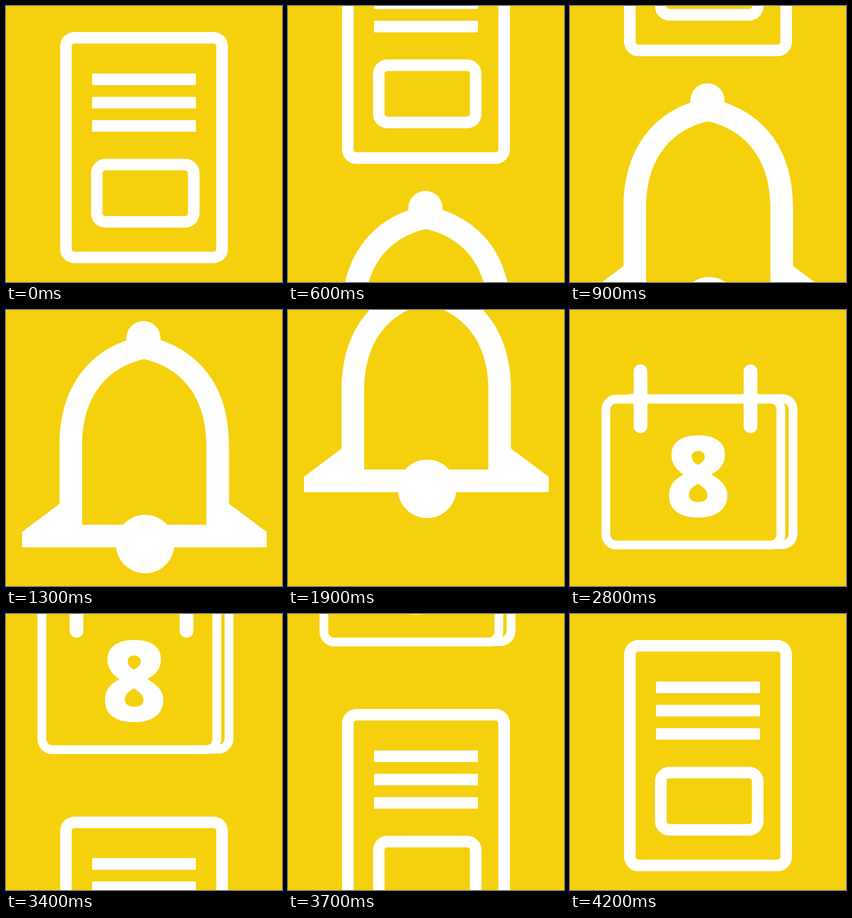
Recreate the animation shown at these times as an HTML page. Size 500x500 px, loop 4300 ms.

```html
<!DOCTYPE html>
<html lang="en">
<head>
<meta charset="utf-8">
<title>Icon scroll</title>
<style>
  html, body { margin: 0; width: 100%; height: 100%; overflow: hidden; background: #f5d00c; }
  svg { display: block; width: 100vw; height: 100vh; }
  .line { fill: none; stroke: #fff; }
  .digit { font: 800 202.5px "Open Sans", sans-serif; text-anchor: middle; }
</style>
</head>
<body>
<svg viewBox="0 0 500 500">
  <defs>
    <g id="page">
      <g class="line" stroke-width="21">
        <rect x="108.5" y="57.5" width="283" height="398" rx="15.5"/>
        <rect x="164.5" y="287.3" width="175.6" height="103.6" rx="15.5"/>
        <path d="M156 132.8H344M156 174.9H344M156 217.2H344"/>
      </g>
    </g>
    <g id="bell" fill="#fff">
      <path fill-rule="evenodd" d="M218 50V46A31 31 0 0 1 280 46V49.5
        C355 75 404 138 404 240V346L472.3 397V425H29V397L97 346V240C97 138 147 75 218 50Z
        M138 384H363V240C363 155 320 100 250 84C180 100 138 155 138 240Z"/>
      <circle cx="252" cy="419" r="53"/>
    </g>
    <g id="calendar">
      <g class="line" stroke-width="16">
        <path d="M104 160.4H385A19 19 0 0 1 404 179.4V406A19 19 0 0 1 385 425H370"/>
        <rect x="65" y="161.4" width="317" height="264.4" rx="19"/>
        <path stroke-width="25" stroke-linecap="round" d="M127.7 111V210.5M327 111V210.5"/>
      </g>
      <text class="digit" x="232" y="373.8" fill="#fff">8</text>
    </g>
  </defs>
  <g id="strip">
    <use href="#page"/>
    <use href="#bell" y="500"/>
    <use href="#calendar" y="1000"/>
    <use href="#page" y="1500"/>
  </g>
</svg>
<script>
  const LOOP = 4300, TICK = 100, HOLD = 4, MOVE = 10, PANEL = 500;
  const strip = document.getElementById('strip');
  const easeOut = p => 1 - (1 - p) ** 2;

  // Each panel rests, then eases to the next in ten discrete steps.
  function scrollAt(ms) {
    const tick = Math.floor((ms % LOOP) / TICK);
    const span = HOLD + MOVE;
    const panel = Math.floor(tick / span);
    const step = Math.max(0, tick % span - HOLD);
    return PANEL * (panel + easeOut(step / MOVE));
  }

  function draw() {
    strip.setAttribute('transform', `translate(0 ${-scrollAt(performance.now())})`);
    requestAnimationFrame(draw);
  }
  draw();
</script>
</body>
</html>
```
